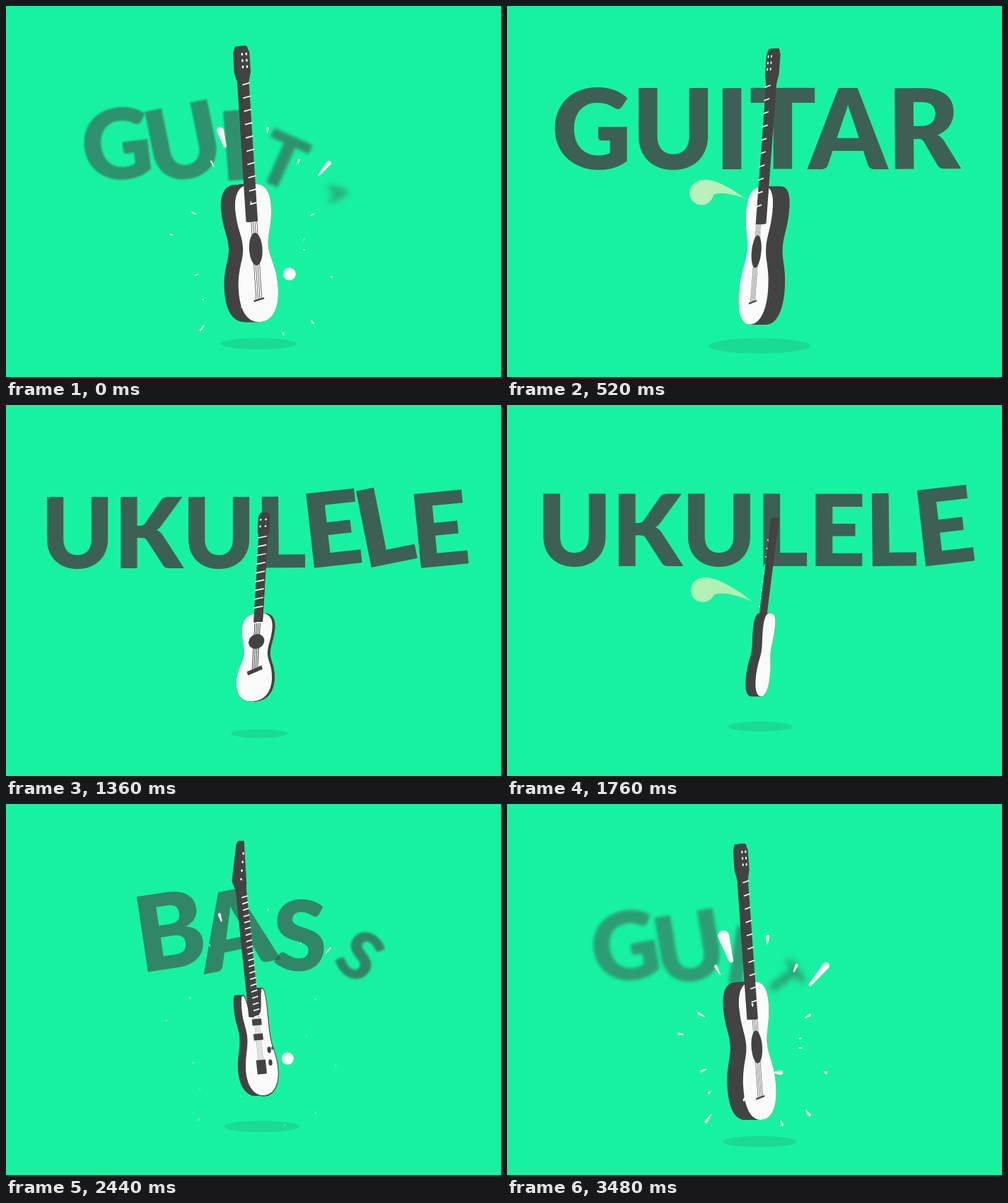
Recreate the animation shown at these times as an HTML page with a canvas. Size 700 by 525 pixels, loop 3520 ms.

```html
<!DOCTYPE html>
<html lang="en">
<head>
<meta charset="utf-8">
<title>Instruments</title>
<style>
html, body { margin: 0; width: 100%; height: 100%; overflow: hidden; background: #17f2a2; }
canvas { display: block; width: 700px; height: 525px; }
</style>
</head>
<body>
<canvas id="stage" width="700" height="525"></canvas>
<script>
const ctx = document.getElementById('stage').getContext('2d');
const LOOP = 3520, STEP = 40;
const BG = '#17f2a2', DARK = '#444344', WHITE = '#fafafa';
const clamp = (v, lo = 0, hi = 1) => Math.min(hi, Math.max(lo, v));
const lerp = ([a, b], u) => a + (b - a) * u;

// Eases in with a small backward pull first.
const inBack = u => u * u * (2.7 * u - 1.7);
const outBack = u => 1 - inBack(1 - u);

function seeded(seed) {
  return () => (seed = seed * 16807 % 2147483647) / 2147483647;
}

function rect(x, y, w, h) {
  ctx.fillStyle = DARK;
  ctx.fillRect(x, y, w, h);
}

function oval(x, y, rx, ry, color) {
  ctx.fillStyle = color;
  ctx.beginPath();
  ctx.ellipse(x, y, rx, ry, 0, 0, 7);
  ctx.fill();
}

function line(x1, y1, x2, y2, width, color) {
  ctx.strokeStyle = color;
  ctx.lineWidth = width;
  ctx.beginPath();
  ctx.moveTo(x1, y1);
  ctx.lineTo(x2, y2);
  ctx.stroke();
}

function strings(half, y1, y2, color) {
  for (let i = -3; i <= 3; i += 2) line(half * i / 3, y1, half * i / 3, y2, 1.1, color);
}

// Closed outline from its right half, given as cubic points from top to bottom.
function mirrored(half) {
  const back = half.slice(0, -1).reverse().map(([x, y]) => [-x, y]);
  const [first, ...rest] = [...half, ...back];
  return new Path2D(`M${first}C${rest.join(' ')}Z`);
}

// Rounded body with an upper bout, a waist and a lower bout.
function bouts(top, bottom, upper, waist, lower) {
  const at = f => top + (bottom - top) * f;
  return mirrored([[0, top], [upper * .8, at(-.02)], [upper * 1.05, at(.08)], [upper, at(.19)],
    [upper * .95, at(.32)], [waist, at(.36)], [waist, at(.45)],
    [waist, at(.54)], [lower, at(.6)], [lower, at(.76)], [lower, at(.92)], [lower * .6, bottom], [0, bottom]]);
}

// Pairs run from the first to the last moment on stage.
const guitar = {
  body: bouts(253, 447, 38, 27, 42),
  neck: new Path2D('M-8 305V107L-13 94V66L-8 57H8L13 66V94L8 107V305Z'),
  depth: 27, mid: 250, x: 353, lean: 0,
  frets: { from: 110, gap: 18.8, count: 10, half: 8 },
  face() {
    oval(0, 344, 14, 23, DARK);
    strings(6, 305, 415, DARK);
    line(-11, 417, 11, 414, 2.4, DARK);
  },
  head() {
    for (const y of [68, 77, 86]) for (const x of [-4.5, 4.5]) oval(x, y, 2, 2, WHITE);
  },
  turn: [82, -136], rise: [-1, 6], size: [1, 1],
  shadow: { x: 357, y: [477, 483], r: [48, 84] }
};

const ukulele = {
  body: bouts(296, 426, 23, 18, 27),
  neck: new Path2D('M-6 308V180L-8 174V151L-5 146H5L8 151V174L6 180V308Z'),
  depth: 17, mid: 286, x: 354, lean: -.035,
  frets: { from: 182, gap: 13, count: 9, half: 7 },
  face() {
    oval(0, 337, 12, 11, DARK);
    strings(4, 310, 378, DARK);
    line(-11, 384, 11, 376, 6, DARK);
  },
  head() {
    for (const y of [156, 166]) for (const x of [-4, 4]) oval(x, y, 1.5, 1.5, WHITE);
  },
  turn: [106, -233], rise: [0, 0], size: [1.015, .84],
  shadow: { x: 358, y: [477, 443], r: [34, 52] }
};

const bass = {
  body: new Path2D('M8 296C14 292 12 264 18 261C26 262 25 285 25 300C25 320 24 325 27 340' +
    'C32 355 36 365 35 380C33 402 18 413 0 413C-20 413 -35 400 -35 378C-35 360 -28 350 -25 335' +
    'C-22 318 -30 310 -30 295C-30 282 -30 270 -24 269C-16 270 -18 292 -8 298Z'),
  neck: new Path2D('M-7 301V122L-13 108L4 58L8 53H13L9 110L7 122V301Z'),
  depth: 14, mid: 240, x: 358, lean: .04,
  frets: { from: 131, gap: 8.9, count: 20, half: 6.5 },
  face() {
    ctx.strokeStyle = DARK;
    ctx.lineWidth = 1.5;
    ctx.stroke(bass.body);
    strings(5, 301, 364, '#aaa');
    for (const y of [304, 325]) rect(-10, y, 20, 9);
    rect(-10, 362, 20, 20);
    for (const y of [349, 367]) oval(20, y, 4, 4.5, DARK);
    oval(27, 347, 2, 2.5, DARK);
  },
  head() {
    for (let i = 0; i < 4; i++) oval(7 - 3.5 * i, 70 + 12 * i, 2, 1.8, WHITE);
  },
  turn: [87, -127], rise: [-2, 10], size: [.984, 1.07],
  shadow: { x: 362, y: [451, 481], r: [47, 81] }
};

// start: burst time; enter, leave, swoosh: offsets from start.
const scenes = [
  { item: guitar, start: -160, length: 1040, enter: -145, leave: 670, swoosh: 560,
    text: 'GUITAR', cap: 113, x: 352, y: 173.5, dy: 0 },
  { item: ukulele, start: 880, length: 1360, enter: -110, leave: 825, swoosh: 770,
    text: 'UKULELE', cap: 101, x: 352, y: 177.5, dy: -4 },
  { item: bass, start: 2240, length: 1120, enter: -87, leave: 735, swoosh: 580,
    text: 'BASS', cap: 114, x: 360, y: 163, dy: -16 }
];

// Letters swing up one by one while the whole word zooms out of the burst.
function drawWord(s, p) {
  const n = s.text.length;
  const zoom = 1 - .47 * Math.exp(-Math.max(p, -80) / 160);
  ctx.font = `900 ${s.cap / .717}px Lato, sans-serif`;
  ctx.textAlign = 'center';
  const width = str => ctx.measureText(str).width;
  const left = s.x - width(s.text) / 2;
  for (let i = 0; i < n; i++) {
    const tin = (p - s.enter - 70 * i) / 400;
    const tout = (p - s.leave - 40 * (n - 1 - i)) / 240;
    if (tin <= 0 || tout >= 1) continue;
    const e = tout > 0 ? 1 - inBack(tout) : outBack(clamp(tin));
    if (e < .03) continue;
    const ch = s.text[i], away = 1 - e;
    const x = left + width(s.text.slice(0, i + 1)) - width(ch) / 2;
    const haze = 5 * Math.max(0, away) + clamp((190 - p) / 30, 0, 3);
    ctx.save();
    ctx.translate(355, 335);
    ctx.scale(zoom, zoom);
    ctx.translate(x - 355 + 50 * e * away, s.y - 335 + 105 * away);
    ctx.rotate(115 * away * Math.PI / 180);
    ctx.scale(e, e);
    ctx.globalAlpha = .83 * clamp(.33 + p / 480) * (tout > 0 ? clamp(e * 1.3) : 1);
    ctx.fillStyle = DARK;
    if (haze > .2) ctx.filter = `blur(${haze.toFixed(2)}px)`;
    ctx.fillText(ch, 0, s.cap / 2);
    ctx.restore();
  }
}

// Flat layers, squeezed and shifted sideways, make a solid that turns.
function drawItem(it, u) {
  const a = lerp(it.turn, u) * Math.PI / 180, c = Math.cos(a), sn = Math.sin(a);
  const lean = it.lean + .085 * sn, k = lerp(it.size, u), dy = lerp(it.rise, u);
  const plane = (z, draw) => {
    ctx.save();
    ctx.setTransform(k * c, -.06, lean, k, it.x - lean * 340 + z * sn * k, it.mid * (1 - k) + dy);
    draw();
    ctx.restore();
  };
  const fill = (path, z, color) => plane(z, () => {
    ctx.fillStyle = color;
    ctx.fill(path);
  });
  const solid = (path, depth) => {
    for (let i = 0; i <= depth; i++) fill(path, c > 0 ? i - depth : -i, DARK);
  };
  const frets = () => plane(1.5, () => {
    const f = it.frets;
    for (let i = 0; i < f.count; i++) {
      const y = f.from + i * f.gap;
      line(-f.half, y + 1, f.half, y - 1, 1.8, WHITE);
    }
    if (c > 0) it.head();
  });
  if (c > 0) {
    solid(it.body, it.depth);
    fill(it.body, 0, WHITE);
    plane(0, it.face);
    solid(it.neck, 8);
    frets();
  } else {
    frets();
    solid(it.neck, 8);
    solid(it.body, it.depth);
    fill(it.body, -it.depth, WHITE);
  }
}

// Two big drops and a ring of small ones: angle, distance, length, radius.
const random = seeded(11);
const drops = [{ angle: -1.87, far: 152, len: 44, w: 8 }, { angle: -.88, far: 136, len: 40, w: 5 }];
for (let i = 0; i < 16; i++) {
  const far = 60 + 110 * random();
  drops.push({ angle: i * 2.4, far, len: far * (.04 + .1 * random()), w: .8 + far / 90 });
}

function drawBurst(p, dy) {
  const size = clamp((230 - p) / 110);
  if (p <= 0 || size <= 0) return;
  const reach = 1.25 * (1 - Math.exp(-p / 75));
  ctx.fillStyle = WHITE;
  for (const d of drops) {
    ctx.save();
    ctx.translate(355, 345 + dy);
    ctx.rotate(d.angle);
    ctx.translate(d.far * reach, 0);
    ctx.scale(size, size);
    ctx.beginPath();
    ctx.arc(Math.max(0, d.len / 2 - d.w), 0, d.w, -Math.PI / 2, Math.PI / 2);
    ctx.arc(-d.len / 2, 0, d.w * .4, Math.PI / 2, -Math.PI / 2);
    ctx.fill();
    ctx.restore();
  }
}

// Tapered trail of circles along a path.
function drawTrail(path, u, span, radius, color) {
  for (let i = 40; i >= 0; i--) {
    const back = i / 40, [x, y] = path(Math.max(0, u - span * back));
    const r = radius * (1 - back) ** 1.1;
    oval(x, y, r, r, color);
  }
}

const bezier = (a, b, c, d, u) => {
  const v = 1 - u;
  return a * v ** 3 + 3 * b * v * v * u + 3 * c * v * u * u + d * u ** 3;
};
const swoosh = u => [bezier(345, 248, 248, 354, u), bezier(277, 220, 300, 345, u)];

function drawBlobs(s, p) {
  const u = (p - 105) / 255;
  if (u > 0 && u < 1) {
    const arc = v => [355 + 46 * Math.sin(Math.PI * Math.sqrt(v)), 380 - 75 * v ** 3 + s.dy];
    drawTrail(arc, u, .05, 9 * Math.min(1, u * 6) * (1 - u ** 3), WHITE);
  }
  const v = (p - s.swoosh) / 290;
  if (v > 0 && v < 1) {
    const pale = clamp(v * 3 - 1);
    const color = `rgb(${lerp([172, 222], pale)},${lerp([238, 250], pale)},${lerp([172, 226], pale)})`;
    drawTrail(swoosh, v, .4, 17 * Math.min(1, v * 3, (1 - v) * 3), color);
  }
}

function render(t) {
  ctx.fillStyle = BG;
  ctx.fillRect(0, 0, 700, 525);
  const local = s => (t - s.start + 400 + LOOP) % LOOP - 400;
  const scene = scenes.find(s => local(s) >= 0 && local(s) < s.length);
  const p = local(scene), u = p / scene.length, { x, y, r } = scene.item.shadow;
  const rx = lerp(r, u);
  oval(x, lerp(y, u), rx, rx * .153, 'rgba(40,90,70,.15)');
  for (const s of scenes) drawWord(s, local(s));
  drawBlobs(scene, p);
  drawItem(scene.item, u);
  drawBurst(p, scene.dy);
}

const origin = performance.now();
function tick() {
  const t = (performance.now() - origin) % LOOP;
  render(Math.floor(t / STEP) * STEP);
  requestAnimationFrame(tick);
}
tick();
</script>
</body>
</html>
```
